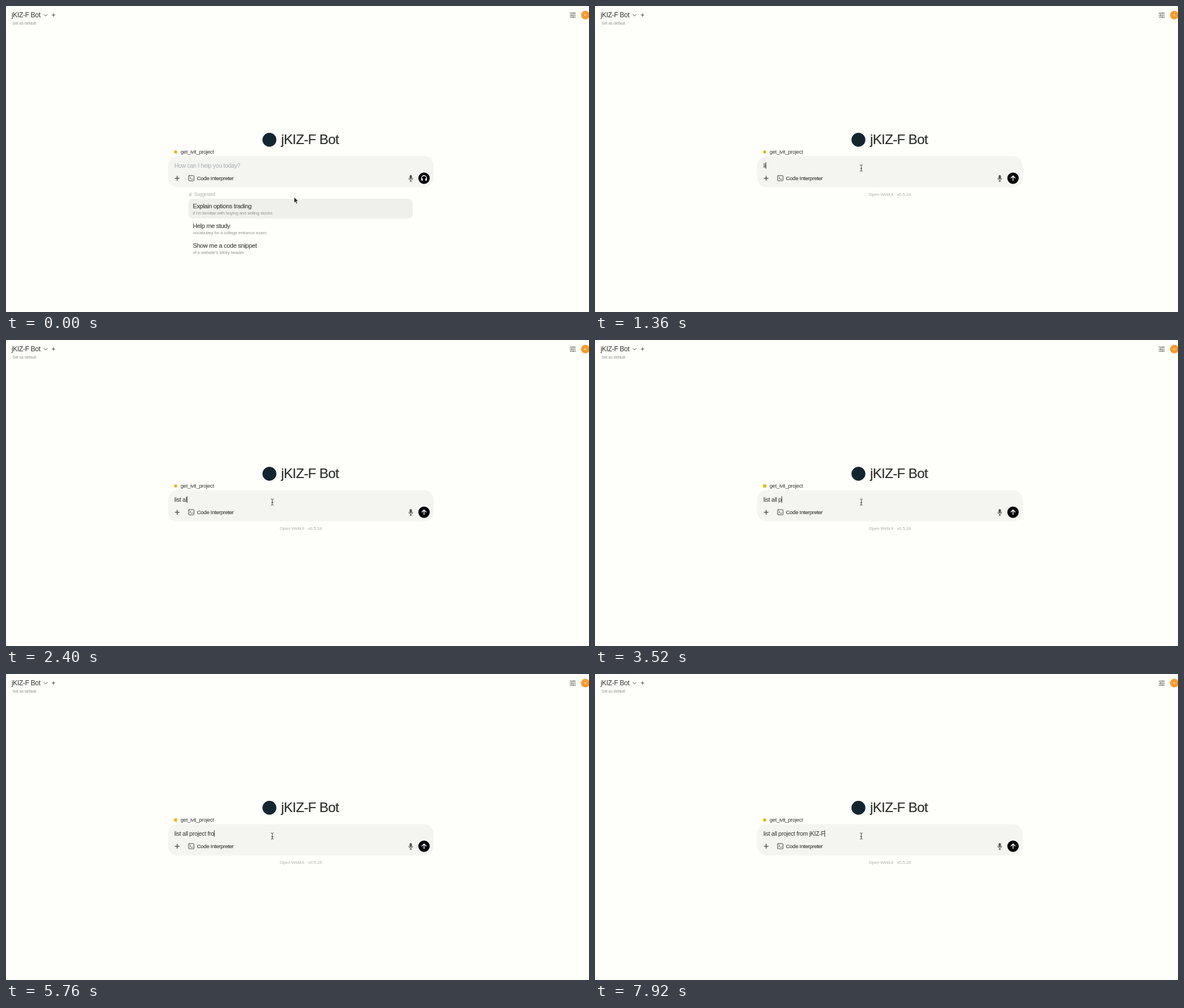
These frames come from a looping animation (1032x543 px, 8 s). An HTML page:

```html
<!DOCTYPE html>
<html lang="en">
<head>
<meta charset="utf-8">
<title>Chat prompt</title>
<style>
  html, body { margin: 0; width: 100%; height: 100%; overflow: hidden; background: #fefffa; }
  svg { display: block; }
  text {
    font-family: "Liberation Sans", Arial, sans-serif;
    letter-spacing: -.027em;
    white-space: pre;
    fill: #333431;
  }
  .medium { stroke: #444541; stroke-width: .18px; fill: #444541; }
  .title { font-size: 24.1px; fill: #2c2e2a; stroke: #2c2e2a; stroke-width: .2px; }
  .name { font-size: 12.05px; }
  .prompt { font-size: 10.5px; }
  .head { font-size: 10.95px; }
  .tool { font-size: 9.4px; }
  .small { font-size: 7.93px; fill: #959693; }
  .pale { fill: #b0b1ae; }
  .line { fill: none; stroke: #444541; stroke-linecap: round; stroke-linejoin: round; }
  .white { stroke: #fff; }
  .ping {
    fill: #eab308;
    transform-origin: 300.3px 259px;
    animation: ping 1s -.55s cubic-bezier(0, 0, .2, 1) infinite;
  }
  @keyframes ping {
    0% { transform: scale(1); opacity: .75; }
    75%, 100% { transform: scale(2); opacity: 0; }
  }
</style>
</head>
<body>
<svg width="1032" height="543" viewBox="0 0 1032 543">
  <!-- top bar -->
  <text class="name" x="10" y="20.3">jKIZ-F Bot</text>
  <text class="small" style="font-size:7.3px" x="11.5" y="33.4">Set as default</text>
  <path class="line" d="M67.2 14.9l2.8 2.8 2.8-2.8M81.6 16h5M84.1 13.5v5"/>
  <path class="line" d="M998.3 12.7h5.4M1006.3 12.7h1.9M998.3 16.2h1.9M1002.7 16.2h5.5M998.3 19.7h4.6M1005.5 19.7h2.7M1005 11.5v2.4M1001.5 15v2.4M1004.2 18.5v2.4"/>
  <circle cx="1025.5" cy="16.2" r="7.6" fill="#fb9a2b"/>
  <text x="1025.5" y="18.2" text-anchor="middle" style="font-size:5.5px;fill:#fff">K</text>

  <!-- heading -->
  <circle cx="466.3" cy="237.4" r="12.3" fill="#13262f"/>
  <text class="title" x="487" y="245.3">jKIZ-F Bot</text>
  <circle class="ping" cx="300.3" cy="259" r="2.7"/>
  <circle cx="300.3" cy="259" r="2.7" fill="#eab308"/>
  <text class="tool" x="309" y="262.2">get_ivit_project</text>

  <!-- input -->
  <rect x="287" y="266.5" width="470" height="55.2" rx="17" fill="#f4f5f1"/>
  <text id="hint" class="prompt" x="298" y="286.8" style="fill:#a9adaf">How can I help you today?</text>
  <text id="typed" class="prompt" x="298" y="286.8"></text>
  <rect id="caret" y="277.3" width="1" height="11.6" fill="#333"/>
  <path class="line" stroke-width="1.4" d="M299.4 305.6h7.2M303 302v7.2"/>
  <rect class="line" x="323.2" y="301" width="9.6" height="9.2" rx="1"/>
  <path class="line" stroke-width=".9" d="M325.3 303.4l1.7 1.6-1.7 1.6M328 307.2h2.6"/>
  <text class="medium" style="font-size:9.49px" x="338" y="309.4">Code Interpreter</text>
  <rect x="714.5" y="300.1" width="4" height="7.2" rx="2" fill="#50514e"/>
  <path class="line" stroke-width=".9" d="M712.9 305.4a3.6 3.6 0 0 0 7.2 0M716.5 309v2.3M715 311.3h3"/>
  <circle cx="740" cy="305.6" r="10.1"/>
  <g id="call">
    <path class="line white" stroke-width="1.3" d="M735.6 307v-1.6a4.4 4.4 0 0 1 8.8 0v1.6"/>
    <path fill="#fff" d="M735 306h2.7v4h-1.2a1.5 1.5 0 0 1-1.5-1.5zM742.3 306h2.7v2.5a1.5 1.5 0 0 1-1.5 1.5h-1.2z"/>
  </g>
  <path id="send" class="line white" stroke-width="1.4" d="M740 309.8v-8.2M736.3 305.2l3.7-3.7 3.7 3.7"/>

  <!-- below the input -->
  <g id="ideas">
    <path class="line" style="stroke:#b0b1ae" stroke-width=".7" d="M327.5 331.2l-3.7 4h2.6l-.9 3 3.8-4.1h-2.6z"/>
    <text class="small pale" style="font-size:8.15px" x="333" y="337.1">Suggested</text>
    <rect id="hover" x="323" y="342" width="397" height="35" rx="7.5" fill="#eff0ec"/>
    <text class="head medium" x="330.7" y="358.6">Explain options trading</text>
    <text class="small" x="330.7" y="369.6">if I'm familiar with buying and selling stocks</text>
    <text class="head medium" x="330.7" y="393.8">Help me study</text>
    <text class="small" x="330.7" y="404.8">vocabulary for a college entrance exam</text>
    <text class="head medium" x="330.7" y="429">Show me a code snippet</text>
    <text class="small" x="330.7" y="440">of a website's sticky header</text>
  </g>
  <text id="version" class="small pale" x="521.8" y="337.1" text-anchor="middle">Open WebUI · v0.5.18</text>

  <!-- mouse -->
  <path id="arrow" d="M0 0v10.4l2.4-2.2 1.7 4 1.8-.8-1.7-3.8h3.2z" fill="#222" stroke="#fff" stroke-width=".7"/>
  <path id="beam" class="line" d="M-2-5.5q2 0 2 1.2V4.3q0 1.2-2 1.2M2-5.5q-2 0-2 1.2M2 5.5q-2 0-2-1.2M-1.2.9h2.4"/>
</svg>
<script>
  const LOOP = 8000, STEP = 80, FOCUS = 1040, UNHOVER = 1000;
  const MOVE = { start: 160, end: 880, from: [510, 339], to: [471.3, 287.6] };
  const INPUT_BOTTOM = 321;

  // text, time of its first key, time between keys
  const bursts = [
    ["list", 1240, 80], [" all", 2080, 160], [" p", 3120, 320],
    ["roject ", 3680, 160], ["from ", 5280, 180],
    ["jK", 6320, 240], ["IZ-F", 6960, 260]
  ];
  const keys = bursts.flatMap(([text, start, gap]) =>
    [...text].map((char, i) => ({ char, at: start + i * gap })));

  const el = {};
  document.querySelectorAll("[id]").forEach(node => el[node.id] = node);
  const show = (node, on) => node.style.display = on ? "" : "none";
  const ease = p => p * p * (3 - 2 * p);

  function drawMouse(t) {
    const p = ease(Math.min(1, Math.max(0, (t - MOVE.start) / (MOVE.end - MOVE.start))));
    const [x, y] = MOVE.from.map((a, i) => a + (MOVE.to[i] - a) * p);
    const overInput = y < INPUT_BOTTOM;
    show(el.arrow, !overInput);
    show(el.beam, overInput);
    (overInput ? el.beam : el.arrow).setAttribute("transform", `translate(${x} ${y})`);
  }

  function drawInput(t) {
    const pressed = keys.filter(k => k.at <= t);
    const text = pressed.map(k => k.char).join("");
    if (el.typed.textContent !== text) el.typed.textContent = text;
    const empty = !text;
    for (const id of ["hint", "call", "ideas"]) show(el[id], empty);
    for (const id of ["send", "version"]) show(el[id], !empty);

    // the blink restarts with every key after the first word
    const blinkStart = pressed.length > 4 ? pressed[pressed.length - 1].at : FOCUS;
    show(el.caret, t >= FOCUS && (t - blinkStart) % 1000 < 500);
    el.caret.setAttribute("x", 298 + (empty ? 0 : el.typed.getComputedTextLength()));
  }

  const origin = performance.now();
  function frame() {
    const elapsed = (performance.now() - origin) % LOOP;
    const t = Math.floor(elapsed / STEP) * STEP;
    drawInput(t);
    drawMouse(t);
    show(el.hover, t < UNHOVER);
    requestAnimationFrame(frame);
  }
  frame();
</script>
</body>
</html>
```
